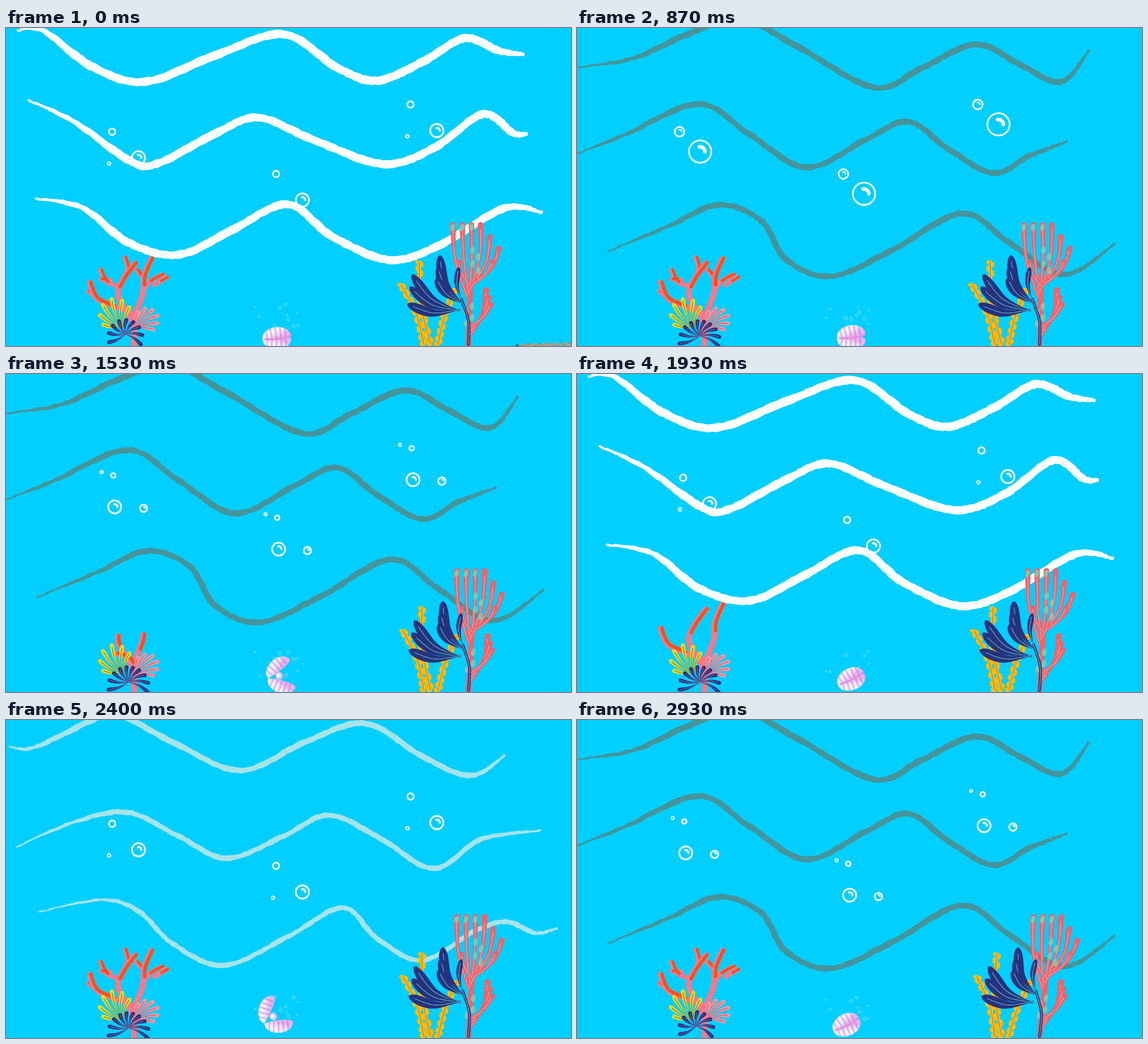
These frames come from a looping animation (998x561 px, 2.99 s). An HTML page with a canvas:

```html
<!DOCTYPE html>
<html lang="en">
<head>
<meta charset="utf-8">
<title>Under the sea</title>
<style>
html, body { margin: 0; width: 100%; height: 100%; overflow: hidden; background: #00cfff; }
canvas { display: block; width: 998px; height: 561px; }
</style>
</head>
<body>
<canvas id="sea" width="998" height="561"></canvas>
<script>
const ctx = document.getElementById('sea').getContext('2d');
const LOOP = 2990, STEP = 200 / 3, TAU = Math.PI * 2, rad = Math.PI / 180;
const noise = n => { const v = Math.sin(n * 127.1 + 3.7) * 43758.5453; return v - Math.floor(v); };
const times = (n, make) => Array.from({ length: n }, (_, i) => make(i));
const ramp = (t, a, b) => Math.max(0, Math.min(1, (t - a) / (b - a)));

// Smooth curve through a few key points, given as x, y, x, y, ...
function curve(p, n = 16) {
  const count = p.length / 2, out = [];
  const at = (i, k) => p[2 * Math.max(0, Math.min(count - 1, i)) + k];
  for (let i = 0; i < count - 1; i++) {
    for (let j = 0; j < n; j++) {
      const t = j / n;
      out.push([0, 1].map(k => {
        const a = at(i - 1, k), b = at(i, k), c = at(i + 1, k), d = at(i + 2, k);
        return b + .5 * t * (c - a + t * (2 * a - 5 * b + 4 * c - d + t * (3 * (b - c) + d - a)));
      }));
    }
  }
  out.push(p.slice(-2));
  return out;
}

// Curve from base to tip that bulges sideways.
const bow = (x0, y0, x1, y1, bend = 0) => curve([x0, y0,
  (x0 + x1) / 2 + (y1 - y0) * bend, (y0 + y1) / 2 - (x1 - x0) * bend, x1, y1]);

function trace(points) {
  const path = new Path2D();
  points.forEach(([x, y], i) => i ? path.lineTo(x, y) : path.moveTo(x, y));
  return path;
}

// Band of varying width around a curve.
function ribbon(c, width, rough = 0) {
  const last = c.length - 1, left = [], right = [];
  c.forEach(([x, y], i) => {
    const a = c[Math.max(0, i - 1)], b = c[Math.min(last, i + 1)];
    const dx = b[0] - a[0], dy = b[1] - a[1], len = Math.hypot(dx, dy) || 1;
    const w = width(i / last) / 2;
    const l = w + (noise(i) - .5) * rough, r = w + (noise(i + 500) - .5) * rough;
    left.push([x - dy / len * l, y + dx / len * l]);
    right.unshift([x + dy / len * r, y - dx / len * r]);
  });
  return trace(left.concat(right));
}

function line(path, color, width) {
  ctx.strokeStyle = color;
  ctx.lineWidth = width;
  ctx.stroke(path);
}

function fill(path, color) {
  ctx.fillStyle = color;
  ctx.fill(path);
}

function oval(x, y, rx, ry, turn, color) {
  ctx.beginPath();
  ctx.ellipse(x, y, rx, ry, turn, 0, TAU);
  ctx.fillStyle = color;
  ctx.fill();
}

// Waves: crests, troughs and the slopes between them.
const wave = (w, ...p) =>
  ribbon(curve(p), u => w * Math.min(1, .2 + u * 5, .35 + (1 - u) * 6), 1.8);

const white = { color: '#fff', paths: [
  wave(14.5, 19,5, 65,4, 150,67, 245,95, 370,48, 490,11, 585,70, 655,93, 735,60, 810,18, 870,40, 916,47),
  wave(14, 38,127, 120,165, 215,232, 265,240, 370,186, 445,158, 540,196, 665,240, 755,212, 842,152, 895,185, 922,187),
  wave(14, 51,301, 135,317, 215,378, 305,400, 400,356, 497,311, 575,367, 675,409, 760,386, 880,318, 948,326)
] };
const dark = { color: '#45949b', paths: [
  wave(10.5, 0,70, 100,53, 200,9, 290,-16, 390,33, 525,105, 610,70, 705,29, 785,66, 855,95, 905,39),
  wave(10, 0,222, 85,188, 215,134, 305,188, 405,246, 510,197, 585,165, 655,213, 735,256, 800,225, 867,200),
  wave(10, 53,395, 160,350, 250,312, 325,340, 370,409, 450,438, 560,390, 680,327, 765,380, 860,435, 951,380)
] };
const pale = { color: '#a6e3e8', paths: [
  wave(10, 5,47, 50,48, 155,-1, 195,-12, 300,42, 415,89, 530,38, 635,6, 735,64, 820,98, 882,62),
  wave(9, 17,225, 120,180, 215,163, 305,205, 390,244, 490,205, 570,168, 660,208, 755,262, 840,210, 945,195),
  wave(8.5, 57,339, 170,317, 235,338, 295,395, 385,433, 500,381, 595,331, 655,385, 735,424, 830,371, 885,356, 935,376, 975,367)
] };
const tide = t => {
  if (t < 470 || (t >= 1535 && t < 2070)) return white;
  return t < 835 || (t >= 2070 && t < 2535) ? pale : dark;
};

// One cluster of bubbles as x, y, radius in each pose, shown three times.
const near = [[187.5,183,5.7], [234,229,11.7], [182,239,2.8]];
const wide = [[169,173,2.5], [189.5,179,4], [192,234.5,11.5], [243,237,6.5]];
const large = [[181,183,8.5], [217.5,218,19.7]];
const loose = [[173,176,5], [193,175,1.8], [199,229,15], [249.5,243,2.8]];
const cluster = [near, wide, wide, large, loose];

function bubble([x, y, r]) {
  const ring = new Path2D();
  ring.arc(x, y, r, 0, TAU);
  line(ring, '#fff', r < 4 ? 2 : 3);
  if (r > 6) {
    const shine = new Path2D();
    shine.arc(x, y, r * .43, -1.75, 0);
    line(shine, '#fff', r * .32);
  }
}

function bubbles(t) {
  const set = cluster[Math.floor((t + 38) % 243 / 48.6)];
  for (const [dx, dy] of [[0, 0], [289.5, 74.5], [527, -48]]) {
    ctx.save();
    ctx.translate(dx, dy);
    set.forEach(bubble);
    ctx.restore();
  }
}

// Leaf outlines: a club swells to a round end, a blade is widest past its middle.
const club = u => (.14 + .86 * u ** 1.6) * Math.sqrt(Math.max(0, 1 - u ** 8));
const frond = u => (.4 + .6 * u ** 4) * Math.sqrt(Math.max(0, 1 - u ** 16));
const blade = u => .1 + .9 * Math.sin(Math.PI * u ** 2) ** .8;

function leaf(form, w, ...base) {
  const c = bow(...base);
  return { shape: ribbon(c, u => w * form(u)), vein: trace(c.slice(0, -5)) };
}

function leaves(list, color, vein, width = 1.2) {
  list.forEach(l => { fill(l.shape, color); line(l.vein, vein, width); });
}

// Leaves spread evenly between two angles, longest in the middle.
const fan = (x, y, w, n, from, to, len, swell) => times(n, i => {
  const u = i / (n - 1), a = (from + (to - from) * u) * rad;
  const l = len + swell * Math.sin(Math.PI * u);
  return leaf(club, w, x, y, x + l * Math.cos(a), y + l * Math.sin(a), .08);
});

const yellowFan = fan(207, 527, 11, 6, -173, -71, 39, 18);
const pinkFan = fan(230, 530, 10.5, 6, -83, 5, 33, 15);
const blueFans = [fan(211, 540, 9.5, 9, -205, 35, 36, -8), fan(217, 543, 9.5, 10, -200, 30, 42, -13)];

// Coral: three stems, then the twigs that branch from them.
const stems = [
  curve([226,562, 222,507, 190,491, 160,476, 148,449]),
  curve([221,512, 198,472, 207,444, 228,415]),
  curve([222,517, 241,471, 244,438, 257,407])
];
const twigs = [
  bow(209, 440, 210, 405, -.15), bow(202, 456, 167, 427, .2), bow(184, 445, 168, 443),
  bow(160, 475, 146, 465), bow(240, 468, 276, 435, .12), bow(262, 453, 284, 440), bow(244, 443, 231, 427)
];

function branches(list, grown, width) {
  if (grown <= 0) return;
  const parts = list.map(c => c.slice(0, Math.max(2, Math.ceil(c.length * grown))));
  parts.forEach(c => line(trace(c), '#f9788b', width));
  ctx.save();
  ctx.translate(1.8, -.8);
  parts.forEach(c => line(trace(c.slice(c.length >> 1)), '#f4511f', width * .6));
  ctx.restore();
}

function reef(t) {
  const regrow = t >= 1120;
  branches(twigs, regrow ? ramp(t, 1940, 2250) : 1, 8);
  branches(stems, regrow ? ramp(t, 1230, 1900) : 1, 10);
  leaves(yellowFan, '#f5d51d', '#3f8f4f');
  leaves(pinkFan, '#fa969f', '#e0566c');
  leaves(blueFans[t >= 640 && t < 2670 ? 1 : 0], '#232c7c', '#a987ae', .9);
}

// Seaweed on the right, swaying about its foot.
const kelp = [bow(738, 558, 698, 453, -.06), bow(750, 558, 730, 413, .05), bow(763, 558, 793, 462, .04)];

const navy = [
  ...times(3, i => leaf(blade, 17, 804, 485, 766 - 3 * i, 401 + 20 * i, .12)),
  leaf(blade, 10, 804, 480, 800, 422, .1),
  ...times(3, i => leaf(blade, 17, 802, 500 - 2 * i, 717 - 4 * i, 435 + 18 * i + 4 * i * i, .12))
];
const navyStem = trace(bow(817, 558, 804, 478, -.08));

const red = [
  ...times(6, i => leaf(frond, 14, 815 + 2 * i, 475 - 5 * i, 789 + 16.5 * i, 342 + 21 * Math.max(0, i - 3), .06 - .04 * i)),
  ...times(3, i => leaf(frond, 15, 818, 545 - 8 * i, 848 + 5 * i, 457 + 13 * i, -.1)),
  leaf(frond, 12, 820, 455, 799, 409, .1),
  leaf(frond, 12, 828, 450, 861, 408, -.1)
];
const redStem = trace(bow(817, 557, 820, 450));
const pods = [
  ...times(3, i => [789 + 16.5 * i, 352]),
  ...times(4, i => [827 + (i % 2 ? 7 : -3), 392 + 12 * i]),
  ...times(4, i => [817 + (i % 2 ? -4 : 6), 491 + 10 * i])
];

// Left, middle, right, middle.
const sway = [0, -.033, -.08, -.033];

function weeds(t) {
  const k = sway[Math.floor((t + 60) % 850 / 212.5)];
  ctx.save();
  ctx.transform(1, 0, k, 1, -k * 558, 0);
  kelp.forEach(c => {
    c.forEach(([x, y], i) => oval(x + (i >> 1) % 2 * 6 - 3, y, 4, 3.2, 0, '#f9bd12'));
    line(trace(c), '#f9bd12', 6);
    line(trace(c), '#dc7d1c', 1.5);
  });
  line(redStem, '#ef636d', 10);
  leaves(red, '#ef636d', '#f9a5a3');
  pods.forEach(([x, y]) => oval(x, y, 4, 6.5, .15, '#91bfa8'));
  line(navyStem, '#26327f', 5);
  leaves(navy, '#26327f', '#58b9bd');
  line(navyStem, '#58b9bd', 1.3);
  ctx.restore();
}

// Shell: hinged on its left, opening once every third of the loop.
const half = new Path2D('M0 0C-1-23 46-28 51-3Q48 1 42 2Q20 4 0 0Z');

function valve(turn, flip) {
  ctx.save();
  ctx.rotate(turn * rad);
  ctx.scale(1, flip);
  const g = ctx.createLinearGradient(8, -20, 18, 3);
  g.addColorStop(0, '#c9b3e0');
  g.addColorStop(.35, '#fdf6fe');
  g.addColorStop(.7, '#f7e0f7');
  g.addColorStop(1, '#eeb0ec');
  fill(half, g);
  ctx.clip(half);
  times(5, i => line(trace([[9 + 8 * i, 0], [5 + 9 * i, -24]]), 'rgba(140,110,190,.38)', 3));
  ctx.restore();
}

function shell(t) {
  const beat = t % (LOOP / 3) / (LOOP / 3);
  const gape = Math.max(0, Math.sin(Math.PI * Math.min(1, beat / .92) ** .75));
  const open = 62 * gape;
  ctx.save();
  ctx.translate(458 - 5 * Math.cos(TAU * t / LOOP), 549 - 14 * gape);
  ctx.rotate((-4 - 33 * ramp(t, 1300, 2300) * ramp(t, 2990, 2900)) * rad);
  valve(open / 2, -1);
  valve(-open / 2, 1);
  if (open > 20) {
    const g = ctx.createRadialGradient(18, -2, 1, 20, 0, 8);
    g.addColorStop(0, '#fff');
    g.addColorStop(1, '#b9a5cf');
    oval(20, 0, 7, 7, 0, g);
  } else {
    line(new Path2D('M5 0Q28 4 48-2'), '#e58fe0', 3.5);
  }
  ctx.restore();
}

function fizz(t) {
  for (let i = 0; i < 10; i++) {
    const x = 428 + noise(i + 11) * 88;
    const y = 487 + (noise(i + 40) * 46 + 92 - t * 46 / LOOP * (1 + i % 2)) % 46;
    const ring = new Path2D();
    ring.arc(x, y, 1 + noise(i + 70) * 2.4, 0, TAU);
    line(ring, 'rgba(185,238,250,.75)', .9);
  }
}

function sand(t) {
  if (t >= 200 && t < 1120 || t >= 1340) return;
  for (let i = 0; i < 60; i++) {
    oval(910 + i * 1.5, 558 + noise(i + 90) * 3 - i * .03, 2.4, 1.8, 0, i % 3 ? '#b9a88c' : '#88836f');
  }
  oval(903, 560, 2.5, 1.8, 0, '#274a50');
}

function draw(t) {
  ctx.lineCap = ctx.lineJoin = 'round';
  ctx.fillStyle = '#00cfff';
  ctx.fillRect(0, 0, 998, 561);
  const { color, paths } = tide(t);
  paths.forEach(p => fill(p, color));
  bubbles(t);
  sand(t);
  reef(t);
  fizz(t);
  shell(t);
  weeds(t);
}

function tick() {
  const n = Math.min(44, Math.floor((performance.now() % LOOP + 4) / STEP));
  draw(Math.round(n * STEP / 10) * 10);
  requestAnimationFrame(tick);
}
tick();
</script>
</body>
</html>
```
